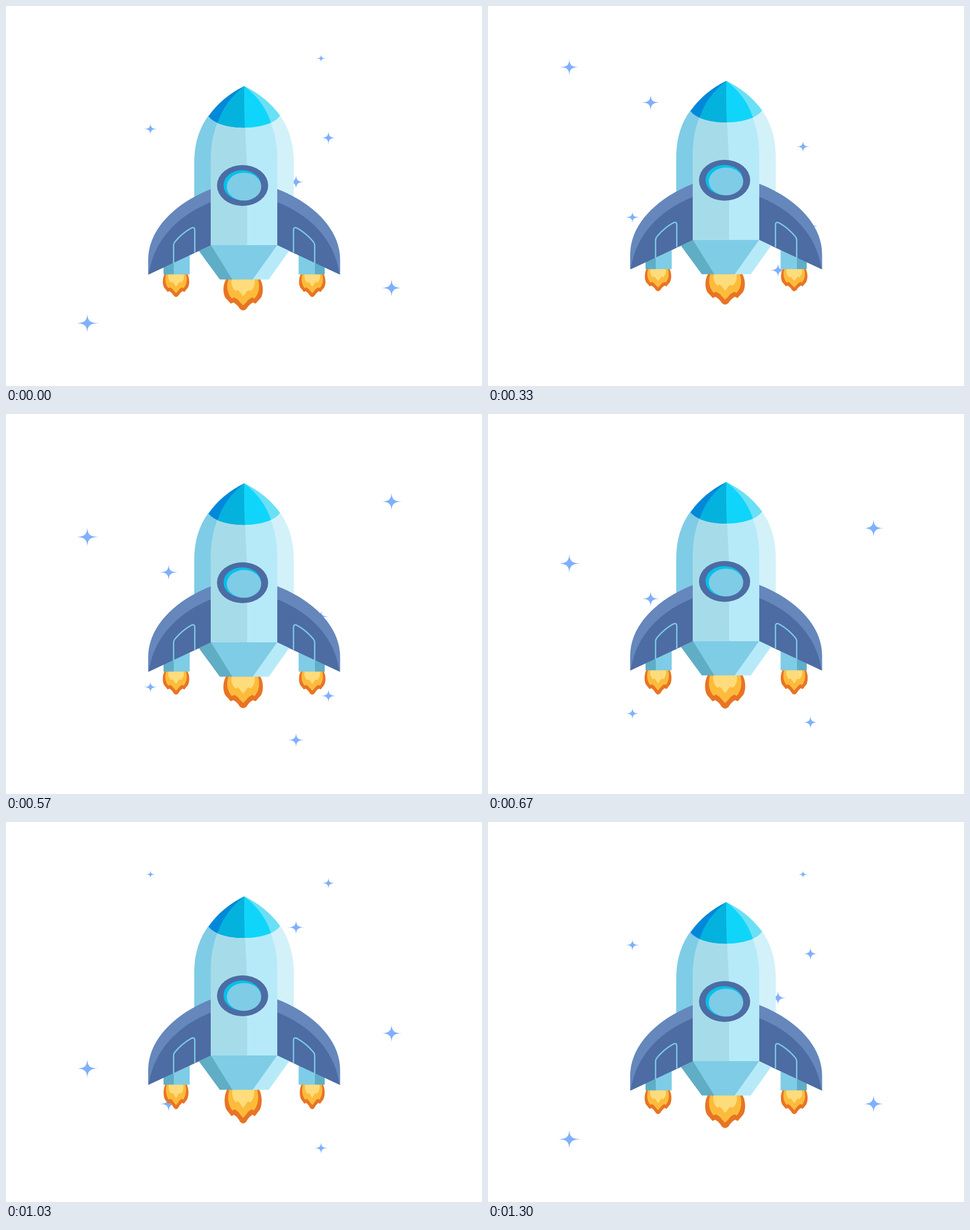
Recreate the animation shown at these times as an HTML page. Size 837 px wide and 669 px high, loop 1330 ms.

```html
<!DOCTYPE html>
<html lang="en">
<head>
<meta charset="utf-8">
<title>Rocket</title>
<style>
  html, body { margin: 0; width: 100%; height: 100%; overflow: hidden; background: #fff; }
  svg { display: block; width: 100%; height: 100%; }
</style>
</head>
<body>
<svg viewBox="0 0 837 669">
  <defs>
    <path id="star" fill="#80b0fc" d="M0-1C.03-.24 .24-.03 1 0C.24 .03 .03 .24 0 1C-.03 .24-.24 .03-1 0C-.24-.03-.03-.24 0-1"/>
    <g id="flame">
      <path fill="#e87424" d="M-30 0C-36 10-36 25-31 33Q-27 37-22 43L-17 41Q-10 45-6 52Q0 58 6 52Q10 45 17 41L22 43Q27 37 31 33C36 25 36 10 30 0Z"/>
      <path fill="#fdbb3b" d="M-26 0C-30 13-28 25-20 34L-16 32Q-9 35-6 40L0 46L6 40Q9 35 16 32L20 34C28 25 30 13 26 0Z"/>
      <path fill="#fedc7b" d="M-20 0C-22 9-19 16-13 21L-10 19Q-6 21-4 25L0 30L4 25Q6 21 10 19L13 21C19 16 22 9 20 0Z"/>
    </g>
    <g id="side">
      <use href="#flame" transform="translate(299 472) scale(.67 .73)"/>
      <path fill="#5faec8" d="M277 440H295V472.5H277Z"/>
      <path fill="#7fcce6" d="M295 430H323V472.5H295Z"/>
      <path fill="#6587bc" d="M361 322C302 345 250 390 250 447V473L361 421Z"/>
      <path fill="#4c6ca3" d="M361 345C304 368 260 410 251 472.5L361 421Z"/>
      <path fill="none" stroke="#7fcce6" stroke-width="2.3" d="M294.7 453V421Q295 417 298 414Q310 400 324 392Q332 387 332 395V434"/>
    </g>
    <clipPath id="nose">
      <path d="M419 141Q380 160 356 194C375 221 463 221 482 193Q458 160 419 141"/>
    </clipPath>
  </defs>
  <g id="stars"></g>
  <g id="rocket">
    <use href="#flame" transform="translate(417 481)"/>
    <path fill="#7fcce6" d="M356 193Q331 227 331 275V345H365L380 200Z"/>
    <path fill="#d3f1f9" d="M482 193Q506 227 506 275V345H472L460 200Z"/>
    <use href="#side"/>
    <use href="#side" transform="matrix(-1 0 0 1 837.5 0)"/>
    <path fill="#a6dcea" d="M372 204Q360 235 360 268V421H425V200Z"/>
    <path fill="#b7eaf8" d="M465 204Q477 235 477 268V421H424V285L420 205Z"/>
    <path fill="#60adc6" d="M361 421L339 431L376 481.5H399Z"/>
    <path fill="#b7eaf8" d="M477 421L498 431L462 481.5H434Z"/>
    <path fill="#7fcce6" d="M360.5 421H477L434 481.5H398Z"/>
    <g clip-path="url(#nose)">
      <path fill="#0288d9" d="M350 140H419V216H350Z"/>
      <path fill="#69e0f6" d="M419 140H490V216H419Z"/>
      <path fill="#04b2de" d="M419 141Q384 168 372 206V216H420Z"/>
      <path fill="#10d5fa" d="M419 141Q454 168 466 206V216H420Z"/>
    </g>
    <ellipse cx="416" cy="316" rx="45" ry="36" fill="#4c6ca3"/>
    <ellipse cx="415.5" cy="315.5" rx="33" ry="26.5" fill="#06c0ea"/>
    <ellipse cx="418.5" cy="318" rx="30.3" ry="24.5" fill="#7fcce6"/>
  </g>
</svg>
<script>
  const LOOP = 1330, STEPS = 39, PEAK = 22.2, LIFT = 21.8;
  const byId = id => document.getElementById(id);

  // x, step offset, half width
  const stars = [
    [143, 30, 19.5], [254, 8, 12], [286, 34, 16], [510, 14, 14.5],
    [554, 0, 12], [567, 9, 13.5], [678, 26, 18.5]
  ].map(([x, offset, size]) => {
    const node = document.createElementNS('http://www.w3.org/2000/svg', 'use');
    node.setAttribute('href', '#star');
    byId('stars').append(node);
    return { node, x, offset, size };
  });

  // step, flame half width, flame length
  const flicker = [
    [0, 34.5, 56], [5, 35.2, 56], [14, 34, 54], [20, 35.2, 60],
    [26, 34.5, 58], [31, 32.5, 61], [39, 35, 59]
  ];

  function flameScale(step) {
    const i = Math.max(1, flicker.findIndex(key => key[0] >= step));
    const a = flicker[i - 1], b = flicker[i];
    const mix = (step - a[0]) / (b[0] - a[0]);
    const at = n => a[n] + (b[n] - a[n]) * mix;
    return `scale(${at(1) / 34.5} ${at(2) / 56})`;
  }

  function draw(time) {
    const step = Math.floor((3 * Math.floor(time % LOOP / 10) + 1) / 10);

    for (const { node, x, offset, size } of stars) {
      const n = (step + offset) % STEPS;
      const s = size * Math.min(1, .68 + n * .16);
      node.setAttribute('transform', `translate(${x} ${92.2 + n * 15.54}) scale(${s} ${s * .88})`);
      node.setAttribute('visibility', n < 33 ? 'visible' : 'hidden');
    }

    const phase = step < PEAK ? step / PEAK : (STEPS - step) / (STEPS - PEAK);
    const rise = LIFT * (1 - Math.cos(Math.PI * phase)) / 2;
    byId('rocket').setAttribute('transform', `translate(0 ${-rise})`);
    byId('flame').setAttribute('transform', flameScale(step));
  }

  const start = performance.now();
  function tick() {
    draw(performance.now() - start);
    requestAnimationFrame(tick);
  }
  tick();
</script>
</body>
</html>
```
